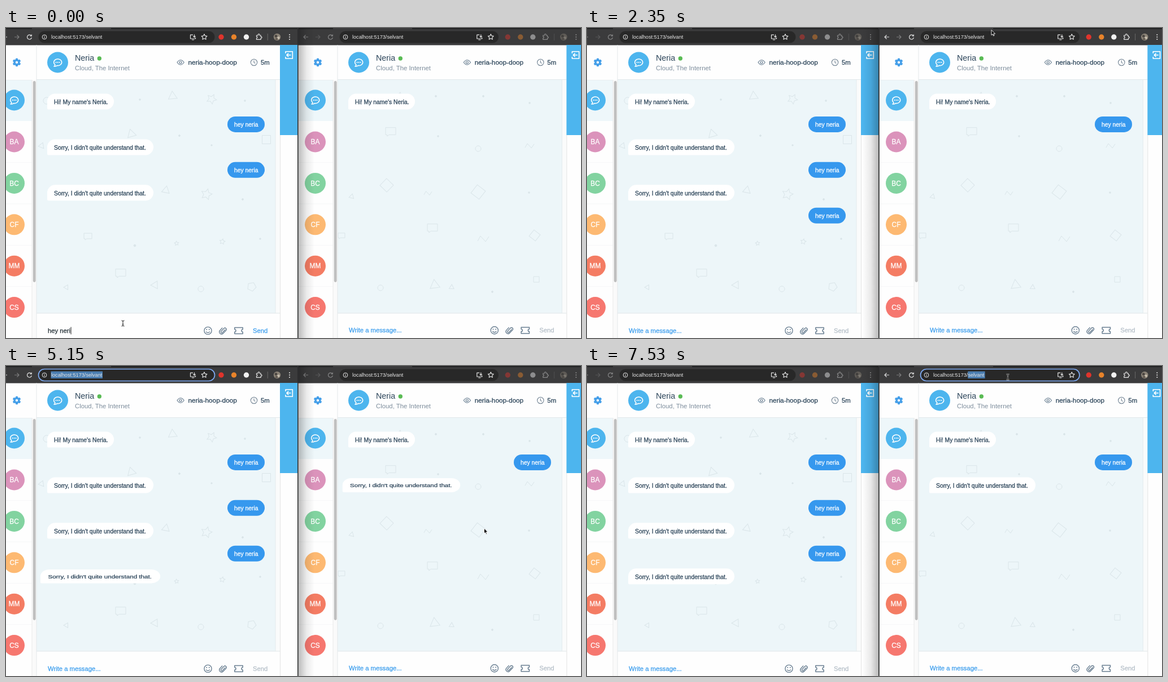
Write an HTML page that moves like this. It is 1018 px wide and 550 px high and loops after 8 s.

```html
<!DOCTYPE html>
<html lang="en">
<head>
<meta charset="utf-8">
<title>Chat in two windows</title>
<style>
html, body { margin: 0; width: 100%; height: 100%; overflow: hidden; background: #fff; }
svg { display: block; width: 1018px; height: 550px; font-family: "Liberation Sans", Arial, sans-serif; }
.mid { stroke-width: .28px; }
</style>
</head>
<body>
<svg id="stage" viewBox="0 0 1018 550" xmlns="http://www.w3.org/2000/svg"></svg>
<script>
const LOOP = 8000;
const stage = document.getElementById('stage');
const BLUE = '#4db5ee', INK = '#2b4459', SLATE = '#7d8d9c', ICON = '#6b8093';

const rect = (x, y, w, h, fill, more = '') =>
  `<rect x="${x}" y="${y}" width="${w}" height="${h}" fill="${fill}" ${more}/>`;
const circle = (x, y, r, fill, more = '') => `<circle cx="${x}" cy="${y}" r="${r}" fill="${fill}" ${more}/>`;
const line = (d, color, w = 1, more = '') =>
  `<path d="${d}" fill="none" stroke="${color}" stroke-width="${w}" stroke-linejoin="round" ${more}/>`;
const group = (x, y, body, more = '') => `<g transform="translate(${x} ${y})" ${more}>${body}</g>`;
// y is the optical middle of the text; "mid" gives it a medium weight
const text = (x, y, s, size, fill, mid = true, more = '') =>
  `<text x="${x}" y="${y + size * .36}" font-size="${size}" fill="${fill}" ${mid ? `class="mid" stroke="${fill}"` : ''} ${more}>${s}</text>`;

// ---- faint background pattern ----
function ring(n, r, star) {
  const count = star ? n * 2 : n;
  return 'M' + Array.from({ length: count }, (_, i) => {
    const a = i / count * Math.PI * 2 - Math.PI / 2, q = star && i % 2 ? r * .5 : r;
    return (Math.cos(a) * q).toFixed(1) + ' ' + (Math.sin(a) * q).toFixed(1);
  }).join('L') + 'Z';
}
const kinds = {
  t: r => ring(3, r), s: r => ring(5, r, true), p: r => ring(5, r),
  q: r => `M${-r} ${-r}H${r}V${r}H${-r}Z`,
  k: r => ring(4, r),
  o: r => ring(24, r),
  d: r => ring(10, r),
  b: r => `M${-r} ${-r * .7}H${r}V${r * .7}H${-r * .3}L${-r * .7} ${r}V${r * .7}H${-r}Z`,
  z: r => `M${-r} ${r * .4}L${-r * .5} ${-r * .5}L${r * .4} ${r * .5}L${r} ${-r * .4}`
};
const turned = { t: 1, s: 1, p: 1, k: .4 };
const pattern = list => list.map(([k, x, y, r]) =>
  `<path d="${kinds[k](r)}" fill="${k === 'd' ? '#dbe6ea' : 'none'}" stroke="#dae5e9" transform="translate(${x} ${y}) rotate(${(x * 7 % 50 - 20) * (turned[k] || 0)})"/>`).join('');

const leftShapes = [
  ['o', 72, 129, 6], ['t', 295, 121, 9], ['s', 364, 126, 9], ['d', 237, 127, 1.3], ['d', 423, 129, 1.3],
  ['t', 222, 188, 9], ['d', 307, 191, 1.5], ['q', 461, 198, 7.5], ['d', 364, 208, 1.2], ['t', 63, 209, 6],
  ['t', 283, 288, 8], ['s', 355, 295, 10], ['d', 419, 304, 1.5], ['b', 145, 369, 7], ['s', 302, 382, 4],
  ['d', 228, 386, 1.8], ['s', 383, 379, 5], ['d', 450, 374, 1.3], ['b', 203, 434, 9], ['t', 264, 456, 8],
  ['o', 345, 463, 5], ['p', 435, 459, 8], ['t', 107, 460, 5]];
const rightShapes = [
  ['t', 697, 120, 6], ['d', 761, 121, 1.5], ['d', 845, 121, 1.5], ['d', 927, 133, 1.3], ['b', 681, 183, 9],
  ['d', 765, 192, 1.3], ['o', 836, 214, 5], ['z', 927, 209, 8], ['k', 674, 279, 12], ['z', 747, 293, 7],
  ['k', 836, 291, 13], ['d', 926, 292, 1.3], ['t', 612, 299, 5], ['b', 755, 354, 9], ['z', 845, 374, 10],
  ['k', 936, 368, 10], ['b', 594, 368, 6], ['t', 759, 456, 10], ['d', 861, 468, 1.5], ['q', 939, 446, 5],
  ['t', 789, 460, 5], ['o', 663, 461, 5]];

// ---- icons ----
const talk = line('M-4.5 4.2A7 5.8 0 1 1 -1 5.6Q-3.5 7.4 -6.5 7Q-4.6 5.8 -4.5 4.2Z', '#fff', 1.5) +
  [-3, 0, 3].map(x => circle(x, 0, 1, '#fff')).join('');
const botIcon = (x, y) => group(x, y, circle(0, 0, 18.5, BLUE) + talk);
const gear = group(19, 61, Array.from({ length: 6 }, (_, i) =>
  rect(-2, -7.3, 4, 5, '#459fe9', `rx="1" transform="rotate(${i * 60})"`)).join('') +
  circle(0, 0, 4, 'none', 'stroke="#459fe9" stroke-width="3.4"'));
const starIcon = group(351, 16, line(ring(5, 5.2, true), '#e4e4e4', 1.1));
const installIcon = group(331, 16, line('M0 -3.8H-4.5V3H4.5V1M-2 5H2M2.5 -4.5V.3M.4 -1.6L2.5 .5L4.6 -1.6', '#e4e4e4', 1.2));
const puzzle = group(447.5, 16, line('M-4 -3H-1.2V-4.2A1.3 1.3 0 0 1 1.4 -4.2V-3H3.6V-.6H4.2A1.3 1.3 0 0 1 4.2 2H3.6V4.4H-4V2A1.4 1.4 0 0 0 -4 -.8Z', '#e4e4e4', 1.2));
const photo = group(480, 16, circle(0, 0, 6.2, '#8b8377') + circle(-2, -1.5, 2.4, '#4c4742') +
  circle(2.4, 1.5, 2.2, '#c9c0b0') + rect(-3, 2, 4, 3, '#5f574e'));

const people = [['BA', '#db93bb'], ['BC', '#82d3a0'], ['CF', '#fdb972'], ['MM', '#f47c63'], ['CS', '#f6776f']];

// dx shifts what hangs on the left edge, dr what hangs on the right edge
function drawWindow(id, dx, dr, pillEnd, panelEnd, shapes, foot) {
  const x0 = dx - 16, wide = panelEnd - x0, right = 477 + dr, chatX = 54 + dx;
  const pill = rect(dx + 57.5, 5.5, pillEnd - dx - 57.5, 21, '#282828', `rx="10.5" id="pill${id}"`);
  const bar = rect(x0, 0, wide, 30.5, '#3b3b3c') + rect(x0, 0, 62, 2, '#202122') +
    rect(dx + 186, 0, panelEnd - dx - 186, 2, '#202122') + pill +
    rect(0, 9.5, 0, 12.5, '#4a7db0', `id="sel${id}"`) +
    group(dx + 68, 16, circle(0, 0, 3.9, 'none', 'stroke="#e4e4e4"') + line('M0 -.6V2.2M0 -2.2V-1.2', '#e4e4e4', 1)) +
    text(dx + 80, 15.8, 'localhost:5173/selvant', 9.15, '#e8e8e8', false) +
    rect(dx + 171.2, 10, 1, 11.5, '#f0f0f0', `id="urlCaret${id}"`) +
    group(dr, 0, installIcon + starIcon) +
    `<g id="tools${id}">` +
    group(dx, 0, line('M2 16H-6M-2.5 12.5L-6 16L-2.5 19.5', '#dedede', 1.2) +
      line('M15 16H23M19.5 12.5L23 16L19.5 19.5', '#7c7c7c', 1.2) +
      line('M44.4 13.4A4 4 0 1 0 45.4 17M45.3 11.5V14.2H42.6', '#dedede', 1.2)) +
    group(dr, 0, circle(381, 16, 4.7, '#e0342c') + circle(403.5, 16, 4.7, '#e8832a') +
      circle(425.5, 16, 4.7, '#f1f1f1') + puzzle + rect(462.8, 10, 1, 12, '#696969') + photo +
      [12, 16, 20].map(y => circle(502, y, 1.05, '#e4e4e4')).join('')) + '</g>';

  const side = rect(dx - 16, 93, 62, 72, '#eef7fa') + rect(dx - 16, 92, 62, 1, '#e9eef1') +
    [238, 311.5, 385, 458].map(y => rect(dx - 16, y, 62, 1, '#f6f7f8')).join('') +
    rect(dx + 46, 92, 8, 458, '#fafafa') + rect(dx + 45.5, 92, 1, 458, '#e9e9e9') +
    rect(dx + 47.8, 94, 4.8, 357, '#bfbfbf', 'rx="2.4"') +
    group(dx, 0, gear + botIcon(14.5, 128) + people.map(([s, c], i) =>
      circle(14.5, 202 + i * 73.4, 18.5, c) +
      text(14.5, 202 + i * 73.4, s, 11.9, '#fff', true, 'text-anchor="middle"')).join(''));

  const head = group(dx, 0, botIcon(91.5, 61) + text(122, 53, 'Neria', 14.3, INK, false) +
      circle(165.3, 54, 3.7, '#59bb54') + text(122, 71, 'Cloud, The Internet', 11.35, SLATE, false)) +
    group(dr, 0, line('M303 61Q309 52.5 315.2 61Q309 69.5 303 61Z', ICON, 1.2) +
      circle(309, 61, 2, 'none', `stroke="${ICON}" stroke-width="1.2"`) +
      text(322.5, 61, 'neria-hoop-doop', 11.75, INK) +
      circle(439, 61, 5.7, 'none', `stroke="${SLATE}" stroke-width="1.2"`) +
      line('M439 57.5V61.3L441.4 62.8', SLATE, 1.2) + text(451, 61, '5m', 11.4, INK));

  const chat = rect(chatX, 92, right - chatX, 414, '#edf6f9') + pattern(shapes) +
    rect(right, 92, 8, 414, '#fafbfb') + rect(right - .5, 92, 1, 414, '#e4ebee') +
    rect(chatX, 91, right + 8 - chatX, 1, '#e1e7ea') + rect(chatX, 505.5, right + 8 - chatX, 1, '#e1e7ea') +
    rect(chatX - .5, 30, 1, 520, '#e4e8ea');

  const footer = text(dx + 74, foot, 'Write a message...', 11.25, '#3b9ded', true, `id="field${id}"`) +
    rect(dx + 118, foot - 6.5, 1, 13, '#222', `id="caret${id}" display="none"`) +
    group(dr, foot - 537, circle(357.5, 537, 6.6, 'none', `stroke="${ICON}" stroke-width="1.4"`) +
      circle(355.2, 535, 1, ICON) + circle(359.8, 535, 1, ICON) + line('M354 538.6Q357.5 542.6 361 538.6', ICON, 1.3) +
      group(384, 537, line('M4.2 -2L-1 3.6A1.6 1.6 0 0 1 -3.2 1.3L2 -4.3A2.6 2.6 0 0 1 5.6 -.6L-.2 5.4A3.9 3.9 0 0 1 -5.6 0L-.8 -5.2', ICON, 1.4)) +
      line('M404.8 531.5H419.2V534.8A2.2 2.2 0 0 0 419.2 539.2V542.5H404.8V539.2A2.2 2.2 0 0 0 404.8 534.8Z', ICON, 1.5) +
      text(437, 537, 'Send', 11.2, '#b5bfc8', true, `id="send${id}"`));

  const panel = rect(485 + dr, 30, panelEnd - 485 - dr, 160, BLUE) + rect(485 + dr, 190, 1, 360, '#e3e3e3') +
    group(501 + dr, 48, line('M-6 -3V-6.2H6.3V6.2H-6V3M3.5 0H-4M-.8 -3.2L-4.2 0L-.8 3.2', '#fff', 1.6));

  return rect(x0, 0, wide, 550, '#fefefe') + bar + side + head + chat + panel + footer + `<g id="talk${id}"></g>`;
}

const fade = (id, from, to) => `<linearGradient id="${id}"><stop offset="0" stop-opacity="${from}"/>` +
  `<stop offset=".5" stop-opacity="${(from + to) * .3}"/><stop offset="1" stop-opacity="${to}"/></linearGradient>`;

stage.innerHTML = `<defs>${fade('toRight', .26, 0)}${fade('toLeft', 0, .28)}</defs>` +
  drawWindow('A', 0, 0, 369.5, 516.5, leftShapes, 537) +
  drawWindow('B', 533, 507.3, 872, 1018, rightShapes, 536.4) +
  rect(518, 0, 28, 550, 'url(#toRight)', 'id="shadeB"') +
  rect(488, 0, 29, 550, 'url(#toLeft)', 'id="shadeA"') +
  rect(516, 0, 1.7, 550, '#2b2c2d') +
  `<path id="arrow" d="M0 0V9.2L2.1 7.2L3.5 10.5L5 9.9L3.6 6.7H6.6Z" fill="#000" stroke="#fff" stroke-width=".9"/>` +
  `<g id="beam">${line('M-2.5 -5Q0 -5 0 -3.5Q0 -5 2.5 -5M0 -4V4M-2.5 5Q0 5 0 3.5Q0 5 2.5 5M-1.2 1.6H1.2', '#fff', 2.2, 'opacity=".7"')}${line('M-2.5 -5Q0 -5 0 -3.5Q0 -5 2.5 -5M0 -4V4M-2.5 5Q0 5 0 3.5Q0 5 2.5 5M-1.2 1.6H1.2', '#222', 1)}</g>`;

const el = id => document.getElementById(id);
const set = (id, attrs) => { for (const k in attrs) el(id).setAttribute(k, attrs[k]); };
const show = (node, on) => node.setAttribute('display', on ? 'inline' : 'none');

// ---- messages ----
const HELLO = "Hi! My name's Neria.", SORRY = "Sorry, I didn't quite understand that.", HEY = 'hey neria';
const SENT = 290, TYPING = 2480, REPLY = 4635;
const messages = [];
function addMessage(id, row, s, w, from = -1, to = LOOP) {
  const me = s === HEY, dx = id === 'A' ? 0 : 533, dr = id === 'A' ? 0 : 507;
  const cx = me ? 458 + dr - w / 2 : 73 + dx + w / 2, cy = 130.5 + row * 40.45;
  const h = w / 2, a = h - 14, corner = me ? `A14 14 0 0 1 ${a} 14` : `A14 14 0 0 1 ${a} 14`;
  const tail = me ? `H${-a}A14 14 0 0 1 ${-a} -14Z` : `H${-h + 2}Q${-h} 14 ${-h} 12V0A14 14 0 0 1 ${-a} -14Z`;
  const node = document.createElementNS(stage.namespaceURI, 'g');
  node.innerHTML = `<path d="M${-a} -14H${a}${corner}${tail}" fill="${me ? '#3698ee' : '#fff'}"/>` +
    text(-h + 12, .6, s, 10.35, me ? '#fff' : INK);
  el('talk' + id).append(node);
  messages.push({ node, cx, cy, from, to });
}
for (const [id, last] of [['A', 5], ['B', 1]]) {
  addMessage(id, 0, HELLO, 118);
  for (let row = 1; row < last; row++) addMessage(id, row, row % 2 ? HEY : SORRY, row % 2 ? 66 : 188);
  addMessage(id, last, HEY, 66, SENT);
  for (let n = 0; n < 4; n++) {
    const start = TYPING + n * 595;
    addMessage(id, last + 1, 'Typing' + '.'.repeat(n % 3 + 1), 55.5 + (n % 3 + 1) * 2.8, start, Math.min(start + 595, REPLY));
  }
  addMessage(id, last + 1, SORRY, 188, id === 'A' ? REPLY : REPLY - 8);
}

// ---- motion ----
const bez = (u, a, b) => 3 * u * (1 - u) ** 2 * a + 3 * u * u * (1 - u) * b + u ** 3;
function ease(x) {
  let lo = 0, hi = 1;
  for (let i = 0; i < 14; i++) { const m = (lo + hi) / 2; bez(m, .25, .25) < x ? lo = m : hi = m; }
  return bez(lo, .1, 1);
}
const smooth = x => x * x * (3 - 2 * x);
// value of [time, ...numbers] keys at t
function track(keys, t, curve) {
  const i = keys.findIndex(k => k[0] > t);
  if (i < 0) return keys[keys.length - 1].slice(1);
  if (!i) return keys[0].slice(1);
  const a = keys[i - 1], b = keys[i], f = curve((t - a[0]) / (b[0] - a[0]));
  return a.slice(1).map((v, j) => v + (b[j + 1] - v) * f);
}
const rubber = [[0, 1, 1], [300, 1.25, .75], [400, .75, 1.25], [500, 1.15, .85], [650, .95, 1.05], [750, 1.05, .95], [1000, 1, 1]];
const mouse = [[0, 207, 524], [480, 207, 524], [1250, 776, 327], [1450, 776, 327], [2350, 716, 3.5], [2700, 704, 13],
  [3100, 704, 13], [3540, 93.5, 17], [4120, 112, 14], [4580, 112, 14], [5150, 846.5, 288], [5380, 846, 288],
  [5740, 726.5, 24.5], [6250, 745, 19.5]];
// how far the right window is in front
const front = [[1290, 0], [1480, 1], [4540, 1], [4600, 0], [5400, 0], [5560, 1]];
const between = (t, a, b) => t >= a && t < b;

function draw(t) {
  for (const m of messages) {
    const on = between(t, m.from, m.to);
    show(m.node, on);
    if (!on) continue;
    const pops = m.from > 0 && m.to === LOOP;
    const [sx, sy] = pops ? track(rubber, t - m.from, ease) : [1, 1];
    m.node.setAttribute('transform', `translate(${m.cx} ${m.cy}) scale(${sx} ${sy})`);
  }

  const typed = t < SENT, field = el('fieldA');
  const words = t < 150 ? HEY.slice(0, -1) : typed ? HEY : 'Write a message...';
  if (field.textContent !== words) field.textContent = words;
  const ink = typed ? '#263238' : '#3b9ded', send = typed ? '#3b9ded' : '#b5bfc8';
  set('fieldA', { fill: ink, stroke: ink });
  set('sendA', { fill: send, stroke: send });
  show(el('caretA'), typed);
  if (typed) set('caretA', { x: 74.5 + field.getComputedTextLength() });

  const [lead] = track(front, t, x => x);
  const rightOn = between(t, 1400, 4560) || t >= 5450;
  set('shadeA', { opacity: lead });
  set('shadeB', { opacity: 1 - lead });
  set('toolsA', { opacity: rightOn ? .45 : 1 });
  set('toolsB', { opacity: rightOn ? 1 : .45 });

  const [x, y] = track(mouse, t, smooth);
  const beam = t < 480 || between(t, 4500, 4650) || t >= 5980;
  show(el('beam'), beam);
  show(el('arrow'), !beam);
  set(beam ? 'beam' : 'arrow', { transform: `translate(${x} ${y})` });

  const focusA = between(t, 4560, 5450), focusB = t >= 6040;
  const pill = (id, focus, a, b) => {
    const hover = between(y, 5, 27) && between(x, a, b);
    set('pill' + id, {
      fill: hover && !focus ? '#303030' : '#282828',
      stroke: focus ? '#7eaaf2' : 'none', 'stroke-width': 1.7
    });
  };
  pill('A', focusA, 57, 370);
  pill('B', focusB, 590, 872);
  set('selA', { x: 79.5, width: focusA ? 91.5 : 0 });
  const all = between(t, 6040, 6300), word = t >= 7500;
  set('selB', { x: all ? 612.5 : 674.3, width: all ? 91.5 : word ? 30.3 : 0 });
  show(el('urlCaretA'), false);
  show(el('urlCaretB'), between(t, 6300, 6780) || between(t, 7380, 7500));
}

function tick(now) {
  draw(now % LOOP);
  requestAnimationFrame(tick);
}
draw(0);
requestAnimationFrame(tick);
</script>
</body>
</html>
```
